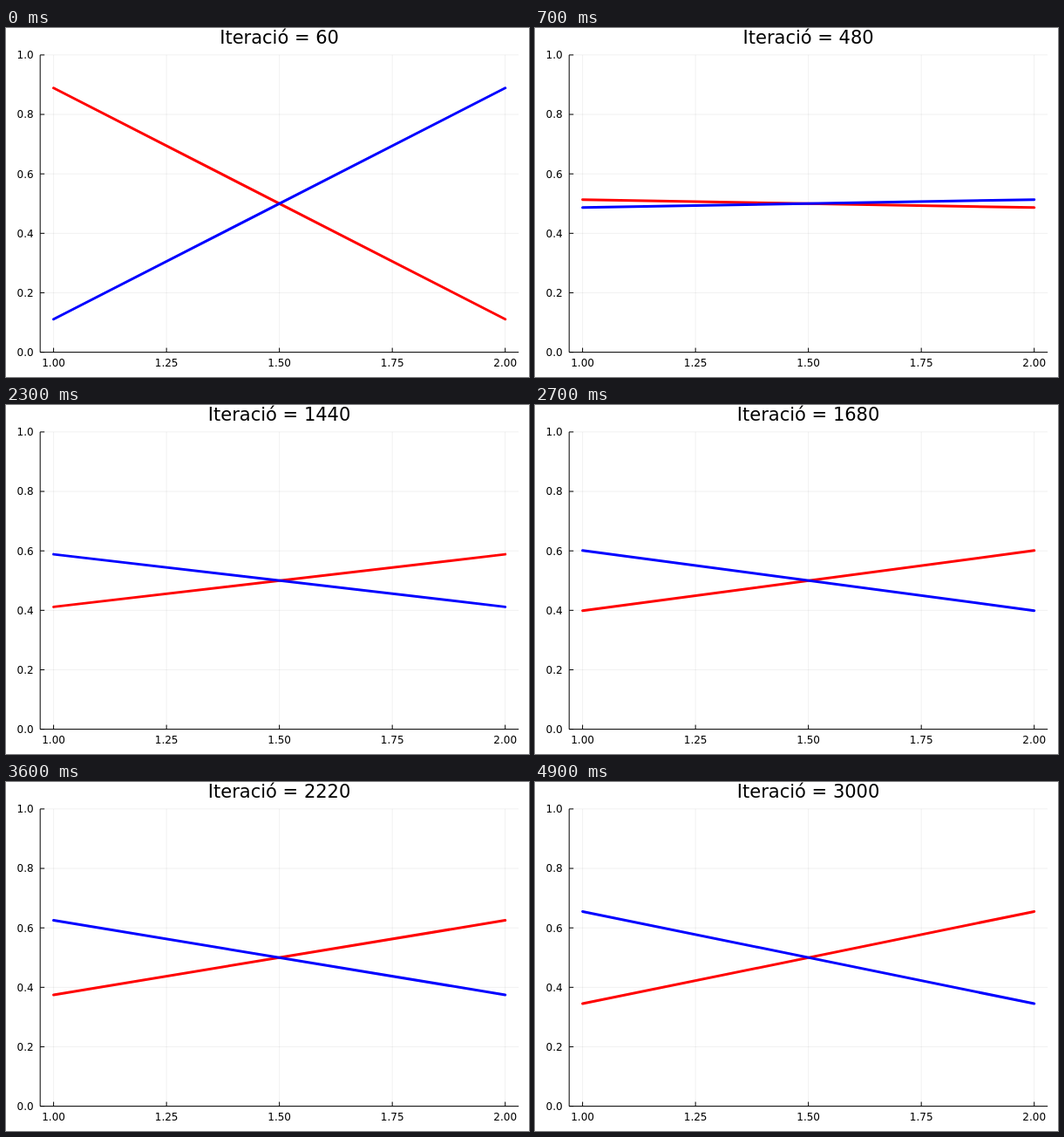
Animation, 600 px wide and 400 px high, one loop 5000 ms. Source, as an HTML page:

```html
<!DOCTYPE html>
<html lang="ca">
<head>
<meta charset="utf-8">
<style>
  html, body { margin: 0; width: 100%; height: 100%; overflow: hidden; background: #fff; }
  svg { display: block; width: 600px; height: 400px; }
  text { font: 12px "DejaVu Sans", sans-serif; text-anchor: middle; }
  .left { text-anchor: end; }
  #title { font-size: 21px; }
  path { fill: none; stroke: #000; }
  #grid { stroke-opacity: .1; stroke-width: .6; }
  .data { stroke-width: 3; stroke-linecap: round; }
</style>
</head>
<body>
<svg viewBox="0 0 600 400">
  <path id="grid"/>
  <path id="axes"/>
  <g id="labels"></g>
  <text id="title" x="313.6" y="18.4"></text>
  <path id="red" class="data" style="stroke:#f00"/>
  <path id="blue" class="data" style="stroke:#00f"/>
</svg>
<script>
const $ = id => document.getElementById(id);
const LEFT = 39.2, RIGHT = 588.2, TOP = 30.9, BOTTOM = 371.6;
const px = x => 54.6 + (x - 1) * 518.1;
const py = y => BOTTOM - y * (BOTTOM - TOP);

let grid = '', labels = '';
let axes = `M${LEFT} ${TOP}V${BOTTOM}H${RIGHT}`;
for (let i = 0; i < 5; i++) {
  const v = 1 + i / 4, x = px(v);
  grid += `M${x} ${TOP}V${BOTTOM}`;
  axes += `M${x} ${BOTTOM}v-5`;
  labels += `<text x="${x}" y="387.5">${v.toFixed(2)}</text>`;
}
for (let i = 0; i < 6; i++) {
  const v = i / 5, y = py(v);
  grid += `M${LEFT} ${y}H${RIGHT}`;
  axes += `M${LEFT} ${y}h5`;
  labels += `<text class="left" x="31.6" y="${y + 4.4}">${v.toFixed(1)}</text>`;
}
$('grid').setAttribute('d', grid);
$('axes').setAttribute('d', axes);
$('labels').innerHTML = labels;

// Blue-to-red ratio at x = 1: fast relaxation, then slow linear drift
const ratio = k => 1.019 + 0.0176 * k - 0.9116 * Math.exp(-0.243 * (k - 1) ** 0.92);

function segment(id, a, b) {
  $(id).setAttribute('d', `M${px(1)} ${py(a)}L${px(2)} ${py(b)}`);
}

function draw(now) {
  const k = Math.floor(now % 5000 / 100) + 1;
  const r = 1 / (1 + ratio(k));
  $('title').textContent = `Iteració = ${k * 60}`;
  segment('red', r, 1 - r);
  segment('blue', 1 - r, r);
}

let start;
function tick(now) {
  start ??= now;
  draw(now - start);
  requestAnimationFrame(tick);
}
draw(0);
requestAnimationFrame(tick);
</script>
</body>
</html>
```
